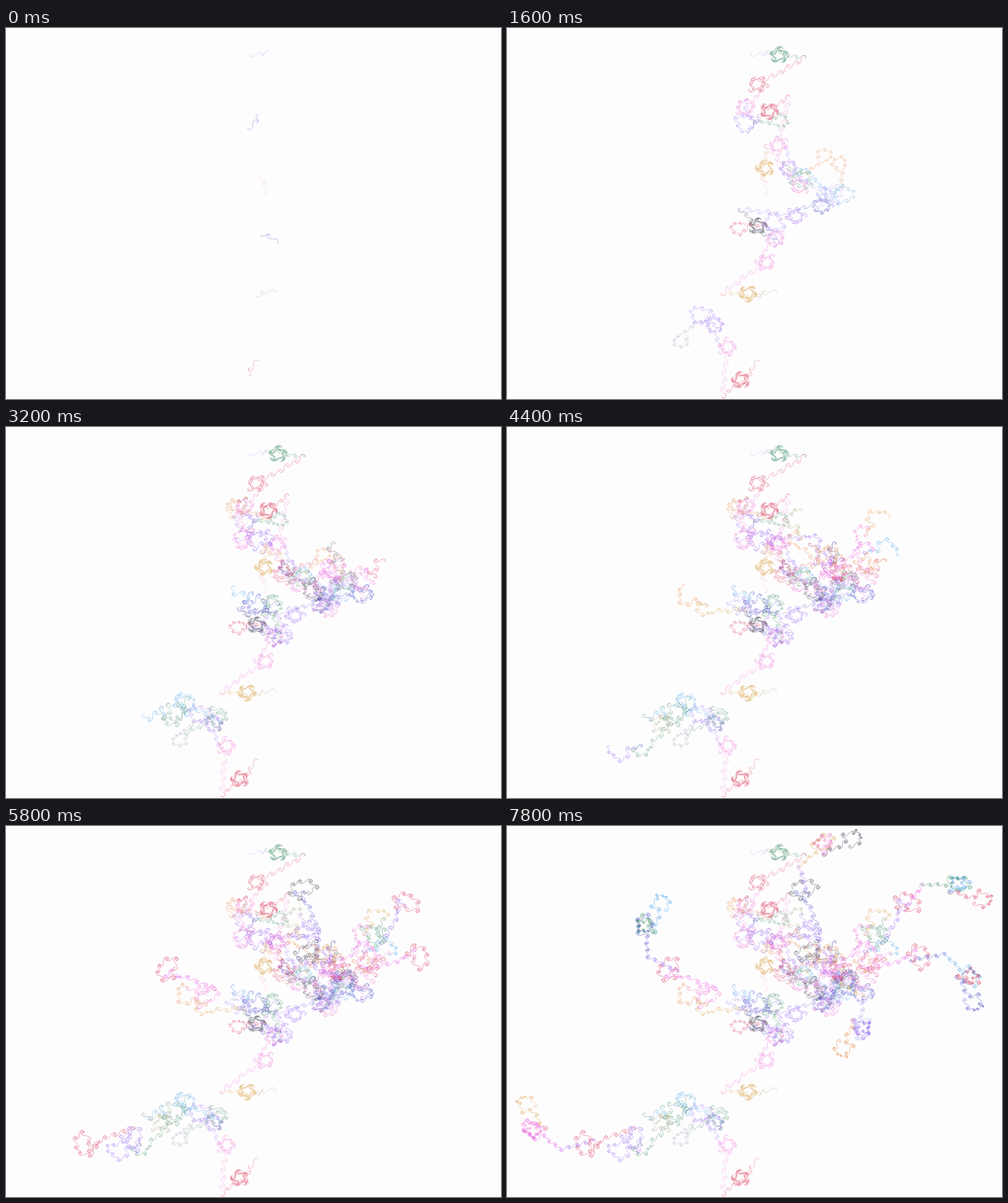
Recreate the animation shown at these times as an HTML page with a canvas. Size 600 by 450 pixels, loop 8 s.

```html
<!DOCTYPE html>
<html lang="en">
<head>
<meta charset="utf-8">
<title>Curlicues</title>
<style>
  html, body { margin: 0; width: 100%; height: 100%; overflow: hidden; background: #fefdfe; }
  canvas { display: block; width: 600px; height: 450px; }
</style>
</head>
<body>
<canvas id="stage" width="600" height="450"></canvas>
<script>
const ctx = document.getElementById('stage').getContext('2d');
const STEP = 200, STEPS = 40, SQUASH = 0.885, TURN = 46.5 * Math.PI / 180, LINK = 10.5;

const PALETTE = {
  r: '#d62e50', p: '#ea68cf', m: '#e03fe0', l: '#a5a2f2', v: '#8750ee', b: '#3a3ec4', s: '#429ee4',
  g: '#3c8c62', o: '#d89f48', e: '#a09c74', k: '#2c3242', f: '#f0a4b4', d: '#8795aa', t: '#e28848'
};

// Six turned copies of one route; one colour letter per stop.
const STRANDS = [
  { x: 330, y: 33, ink: 'lggrpvgtpvopvtkvbolvt' },
  { x: 318, y: 101, ink: 'brrpvgtrkpvrmspmrbsrb' },
  { x: 313, y: 170, ink: 'fooplstvbprtpogvrmgsr' },
  { x: 304, y: 240, ink: 'bkkvblspgmkvtevbkvopk' },
  { x: 292, y: 322, ink: 'eooppvrvgbslotpmrvbgs' },
  { x: 283, y: 427, ink: 'rrrpvvdgsgsegvvrrvmpo' }
];

// Key points of the route: x, y and the number of links that swirl there.
const STOPS = [
  [5, -11, 1], [0, 0, 20], [-20, 21, 0], [-15, -40, 14], [-32, -68, 14], [-50, -80, 10], [-73, -48, 8],
  [-28, -72, 14], [-62, -92, 14], [-80, -78, 14], [-103, -85, 4], [-95, -66, 11], [-116, -38, 6],
  [-150, -36, 6], [-128, -47, 11], [-176, -46, 4], [-184, -42, 8], [-218, -35, 0], [-250, -58, 11],
  [-251, -57, 12], [-262, -93, 7]
];

function seeded(seed) {
  return () => (seed = seed * 16807 % 2147483647) / 2147483647;
}

// The pace slows down along the route.
function stepAt(progress) {
  return Math.ceil((STEPS - 1) * Math.max(0, progress / (STOPS.length - 1)) ** 1.3);
}

function buildRoute() {
  const random = seeded(4127);
  const steps = Array.from({ length: STEPS }, () => []);
  let at = [21, -25];
  STOPS.forEach(([x, stopY, swirl], stop) => {
    const y = stopY / SQUASH;
    const radius = swirl ? Math.min(14, 8 + stop) : 0;
    const [x0, y0] = at;
    const dx = x - x0, dy = y - y0;
    const distance = Math.hypot(dx, dy);
    const hops = Math.round(Math.max(0, distance - radius) / LINK);
    const eyes = [];
    for (let i = 1; i <= hops; i++) {
      const part = i * (1 - radius / distance) / hops;
      const sway = (random() - 0.5) * 5 / distance;
      eyes.push([x0 + dx * part - dy * sway, y0 + dy * part + dx * sway]);
    }
    let angle = Math.atan2(-dy, -dx);
    for (let i = 0; i < swirl; i++) {
      const r = radius * (stop === 1 ? 0.7 + 0.4 * random() : 0.35 + 0.85 * random());
      angle += LINK / radius * (0.8 + 0.5 * random());
      eyes.push([x + r * Math.cos(angle), y + r * Math.sin(angle)]);
    }
    eyes.forEach((to, i) => {
      steps[stepAt(stop - 1 + (i + 1) / eyes.length)].push({ from: at, to, stop });
      at = to;
    });
  });
  return steps;
}

// Euler spiral from eye to eye, scaled so that the eyes lie at -1/2 and +1/2.
function eulerLink(reach, every) {
  const half = [];
  const dt = 0.02;
  let x = 0, y = 0;
  for (let i = 0; i * dt <= reach; i++) {
    if (i % every === 0) half.push([(x + y) / 2, (y - x) / 2]);
    const a = Math.PI / 2 * ((i + 0.5) * dt) ** 2;
    x += Math.cos(a) * dt;
    y += Math.sin(a) * dt;
  }
  return half.slice(1).reverse().map(([u, v]) => [-u, -v]).concat(half);
}

const route = buildRoute();

// Links start out thin and angular and grow rounder and more tightly curled.
function drawStep(step) {
  const age = step / (STEPS - 1);
  const shape = eulerLink(1.65 + 0.65 * age, Math.round(12 - 7 * age));
  ctx.lineWidth = 0.27 + 0.13 * age;
  STRANDS.forEach(({ x, y, ink }, row) => {
    ctx.setTransform(1, 0, 0, SQUASH, x, y);
    ctx.rotate((STRANDS.length - 1 - row) * TURN);
    for (const { from, to, stop } of route[step]) {
      const dx = to[0] - from[0], dy = to[1] - from[1];
      const cx = (from[0] + to[0]) / 2, cy = (from[1] + to[1]) / 2;
      ctx.strokeStyle = PALETTE[ink[stop]];
      ctx.beginPath();
      for (const [u, v] of shape) ctx.lineTo(cx + u * dx - v * dy, cy + u * dy + v * dx);
      ctx.stroke();
    }
  });
}

function clear() {
  ctx.setTransform(1, 0, 0, 1, 0, 0);
  ctx.fillStyle = '#fefdfe';
  ctx.fillRect(0, 0, 600, 450);
}

const start = performance.now();
let drawn = STEPS;

function tick() {
  const step = Math.floor((performance.now() - start) / STEP) % STEPS;
  if (step < drawn) {
    clear();
    drawn = -1;
  }
  while (drawn < step) drawStep(++drawn);
  requestAnimationFrame(tick);
}

tick();
</script>
</body>
</html>
```
